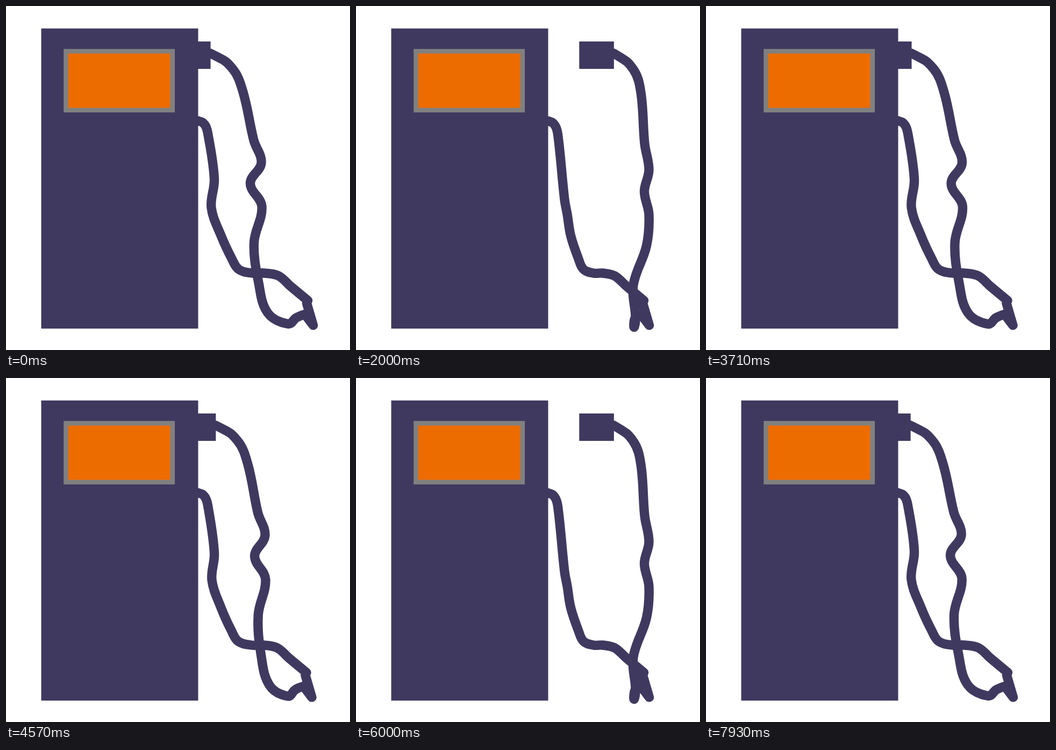
An HTML page that plays this animation: 640x640 px, repeating every 8000 ms.

```html
<!DOCTYPE html>
<html lang="en">
<head>
<meta charset="utf-8">
<title>Fuel pump</title>
<style>
  html, body { margin: 0; width: 100%; height: 100%; overflow: hidden; background: #fff; }
  svg { display: block; width: 100vw; height: 100vh; }
</style>
</head>
<body>
<svg viewBox="0 0 640 640">
  <g fill="#40395f">
    <rect x="65.5" y="41.8" width="292" height="558.4"/>
    <rect id="handle" y="66" width="64.6" height="51"/>
  </g>
  <rect x="111.5" y="84.2" width="198.3" height="109.5" fill="#ed6c00" stroke="#808080" stroke-width="8.5"/>
  <path id="hose" fill="none" stroke="#40395f" stroke-width="17.4" stroke-linecap="round" stroke-linejoin="round"/>
</svg>
<script>
const PERIOD = 4000;
const REACH = 99.3;
const handle = document.getElementById('handle');
const hose = document.getElementById('hose');

// Bends of the hanging strand: x, y at rest, then the offset at full reach.
const down = [
  [380, 88, REACH, 0], [421, 116, 95, 2], [441, 160, 89, 1], [461, 250, 76, 6],
  [475, 292, 70, 13], [454.5, 330, 82, 15], [476, 373, 69, 15], [461.5, 440, 79, 6],
  [470, 515, 46, 4], [487, 571, 33, 7], [525, 591.5, -7, 5], [540, 580, -21, 1], [556, 573.5, -26, 0]
];

// Bends of the strand that returns to the pump; slack() moves them.
const tip = [[571.5, 594], [559.5, 553]].map(slack);
const back = [
  [561.5, 548], [529, 521], [507, 502], [481, 497], [458, 497], [433, 490], [420, 470],
  [400, 427], [382, 375], [387.5, 322], [375.5, 237], [369.5, 220.5], [357, 213.5]
].map(slack);

function bump(v, mid, width) {
  return Math.exp(-(((v - mid) / width) ** 2));
}

// The low end swings left, fading out near the pump, while the upper bend slides down.
function slack([x, y]) {
  const swing = Math.max(0, Math.min(1, (x - 396) / 100));
  return [x, y, 11 * bump(y, 375, 30) - 26 * swing, 38 * bump(y, 322, 50)];
}

// Cubic bezier easing (.65, 0, .35, 1), solved by bisection.
function ease(x) {
  let lo = 0, hi = 1;
  for (let i = 0; i < 30; i++) {
    const s = (lo + hi) / 2, r = 1 - s;
    if (1.95 * s * r * r + 1.05 * s * s * r + s * s * s < x) lo = s; else hi = s;
  }
  return lo * lo * (3 - 2 * lo);
}

const fmt = p => p.map(v => v.toFixed(2)).join(' ');
const span = (a, b) => Math.hypot(b[0] - a[0], b[1] - a[1]);

// Rounded curve: each bend runs parallel to the line between its neighbours.
function spline(pts) {
  const last = pts.length - 1;
  const grip = (i, to) => {
    if (i === 0 || i === last) return null;
    const a = pts[i - 1], b = pts[i + 1], p = pts[i];
    const f = 0.36 * (to - i) * span(p, pts[to]) / span(a, b);
    return [p[0] + (b[0] - a[0]) * f, p[1] + (b[1] - a[1]) * f];
  };
  let d = fmt(pts[0]);
  for (let i = 0; i < last; i++) {
    const c1 = grip(i, i + 1), c2 = grip(i + 1, i);
    d += ` C${fmt(c1 || c2)} ${fmt(c2 || c1)} ${fmt(pts[i + 1])}`;
  }
  return d;
}

function draw(ms) {
  const t = (ms % PERIOD) / PERIOD * 2;
  const k = ease(t < 1 ? t : 2 - t);
  const pose = pts => pts.map(([x, y, dx, dy]) => [x + dx * k, y + dy * k]);
  handle.setAttribute('x', (316 + REACH * k).toFixed(2));
  hose.setAttribute('d',
    `M${spline(pose(down))} L${pose(tip).map(fmt).join(' L')} L${spline(pose(back))}`);
}

const start = performance.now();
function tick() {
  draw(performance.now() - start);
  requestAnimationFrame(tick);
}
tick();
</script>
</body>
</html>
```
